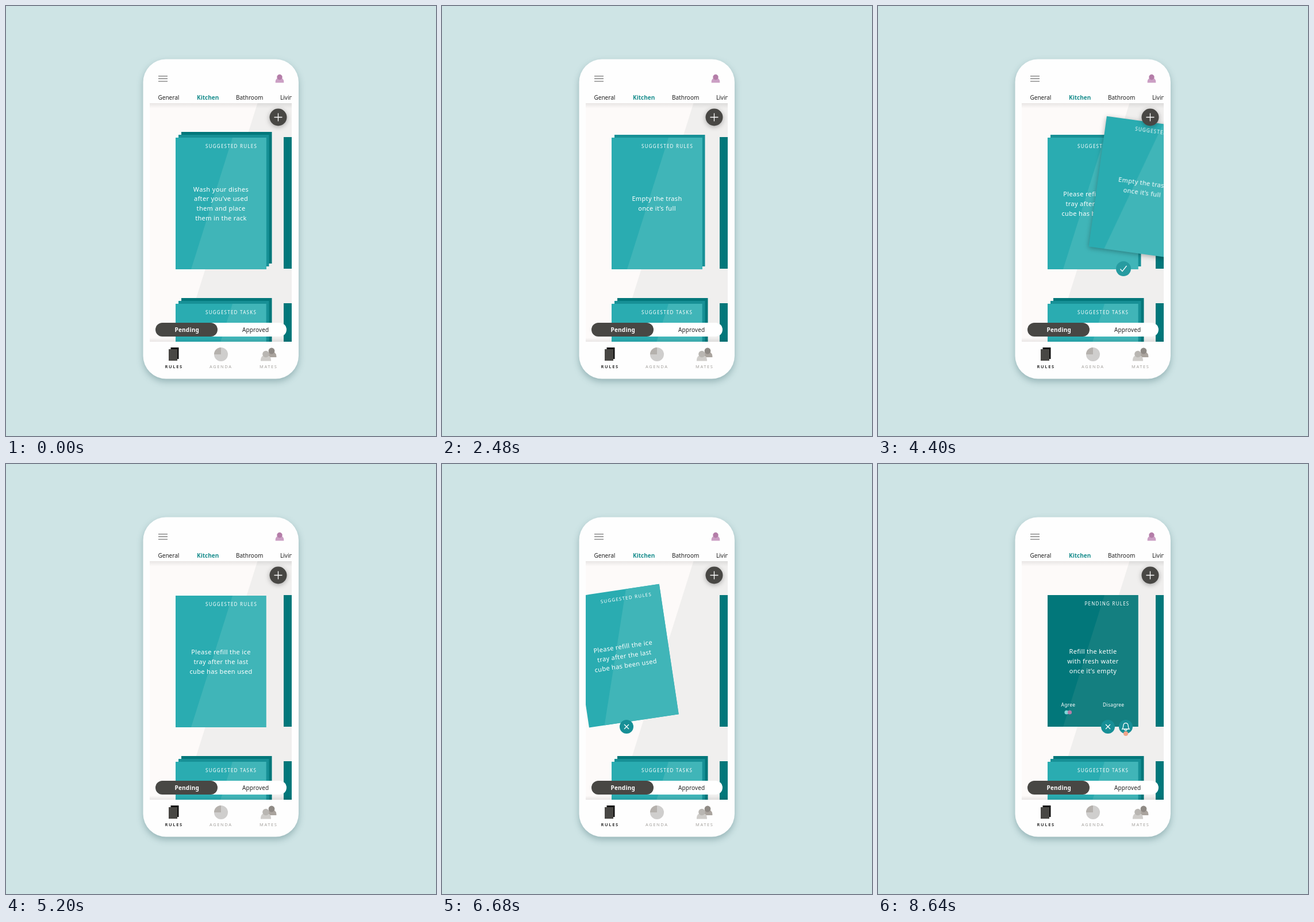
Write an HTML page that moves like this. It is 748 px wide and 748 px high and loops after 8680 ms.

```html
<!DOCTYPE html>
<html lang="en">
<head>
<meta charset="utf-8">
<title>House rules</title>
<style>
html, body { margin: 0; width: 100%; height: 100%; overflow: hidden; background: #cee4e5; }
svg { display: block; width: 100vw; height: 100vh; }
text { font-family: "Noto Sans", "Open Sans", sans-serif; font-size: 10px; fill: #222; }
.title { font-size: 8px; font-weight: 500; letter-spacing: 1.25px; fill: #fff; }
.rule { font-size: 11px; letter-spacing: .35px; fill: #fff; text-anchor: middle; }
.vote { font-size: 8.5px; letter-spacing: .25px; fill: #fff; }
.nav { font-size: 7.5px; letter-spacing: 1.6px; fill: #a5a29e; }
.line { fill: none; stroke: #fff; stroke-width: 1.3; }
.phone { filter: drop-shadow(0 5px 6px rgba(20, 70, 75, .3)); }
.lift { filter: drop-shadow(0 2px 4px rgba(0, 0, 0, .3)); }
</style>
</head>
<body>
<svg id="stage" viewBox="0 0 748 748"></svg>
<script>
const LOOP = 8680;
const W = 157.5, H = 229, X = 295, PITCH = 188;
const TEAL = ['#2aacb1', '#40b5b8'], DARK = ['#02777a', '#147f80'];
const MID = '#179096';

const rect = (x, y, w, h, fill, more = '') =>
  `<rect x="${x}" y="${y}" width="${w}" height="${h}" fill="${fill}" ${more}/>`;
const circle = (x, y, r, fill, more = '') =>
  `<circle cx="${x}" cy="${y}" r="${r}" fill="${fill}" ${more}/>`;
const text = (x, y, str, more = '') => `<text x="${x}" y="${y}" ${more}>${str}</text>`;
const line = d => `<path class="line" d="${d}"/>`;

// A sheet with a diagonal sheen, a heading and centred copy
function card(x, y, [left, right], title, titleX, lines) {
  const copy = lines.map((str, i) =>
    text(x + 79, y + 118.8 + (i - (lines.length - 1) / 2) * 16.7, str, 'class="rule"'));
  return rect(x, y, W, H, left) +
    `<path d="M${x + 99} ${y}H${x + W}V${y + H}H${x + 27}z" fill="${right}"/>` +
    text(x + titleX, y + 18.3, title, 'class="title"') + copy.join('');
}

const person = (x, y, r, head, body) =>
  `<path d="M${x - r * 1.55} ${y + r * 2.05}v-2a${r * 1.55} ${r * 1.5} 0 0 1 ${r * 3.1} 0v2z" fill="${body}"/>` +
  circle(x, y, r, head);

const cross = line('M-4 -4L4 4M4 -4L-4 4');
const crossButton = circle(0, 0, 12, '#178f96') + cross;
const bell = circle(0, 0, 12, '#178f96') +
  line('M-6 4C-4 2 -4.5 -1 -4 -3C-3 -7.5 3 -7.5 4 -3C4.5 -1 4 2 6 4zM-2 4.5a2 2 0 0 0 4 0') +
  circle(0, 12, 4, '#f0a58a');

const rules = [
  ['Wash your dishes', 'after you’ve used', 'them and place', 'them in the rack'],
  ['Empty the trash', 'once it’s full'],
  ['Please refill the ice', 'tray after the last', 'cube has been used']
];
const stack = rules.map((lines, i) =>
  `<g id="card${i}">${card(X, 229, TEAL, 'SUGGESTED RULES', 52, lines)}</g>`).reverse().join('');

const pending = `<g transform="translate(${PITCH})">` +
  card(X, 228, DARK, 'PENDING RULES', 64.5, ['Refill the kettle', 'with fresh water', 'once it’s empty']) +
  text(318.5, 421.5, 'Agree', 'class="vote"') + text(391, 421.5, 'Disagree', 'class="vote"') +
  circle(328, 432, 3.6, '#7fd6d8') + circle(333.5, 432, 3.6, '#b47da8') +
  `<g transform="translate(400 457)">${crossButton}</g>` +
  `<g transform="translate(431 457)">${bell}</g></g>`;

const screen = rect(250, 169, 247, 415, '#fdfaf9') +
  '<path d="M437.500 169H497V584H307z" fill="#f0efee"/>' +
  '<g id="track">' +
  rect(X + 10, 219, W, H, DARK[0], 'id="back"') + rect(X + 5, 224, W, H, MID, 'id="mid"') +
  pending + rect(X + 2 * PITCH, 228, W, H, DARK[0]) + stack + '</g>' +
  rect(X + 10, 508, W, H, DARK[0]) + rect(X + 5, 513, W, H, MID) +
  card(X, 518, TEAL, 'SUGGESTED TASKS', 52, []) + rect(X + PITCH, 517, W, H, DARK[0]) +
  `<g id="no">${crossButton}</g>` +
  `<g id="yes">${circle(0, 0, 13, '#279ba0')}${line('M-5.500 0.500L-2 4.500L5.500 -5')}</g>` +
  rect(250, 169, 247, 9, 'url(#shade)') +
  rect(250, 577, 247, 7, 'url(#shade)', 'transform="rotate(180 373.5 580.5)"') +
  `<g class="lift">${circle(473.5, 193.5, 15, '#484744')}</g>` + line('M466.500 193.500h14M473.500 186.500v14') +
  rect(260, 551, 228, 24, '#fff', 'rx="12"') + rect(260, 551, 108, 24, '#484744', 'rx="12"') +
  text(293.5, 567, 'Pending', 'style="fill:#fff;font-weight:700;letter-spacing:.2px"') +
  text(411, 567, 'Approved', 'letter-spacing=".1"');

const header =
  '<path d="M265 122h16M265 126.500h16M265 131h16" stroke="#555" stroke-width="1.2"/>' +
  person(476, 123.8, 4.7, '#b47da8', '#cb9fc4') +
  text(264.5, 162.5, 'General') +
  text(332, 162.5, 'Kitchen', 'style="fill:#178c8c;font-weight:700"') +
  text(400, 162.5, 'Bathroom') +
  `<g clip-path="url(#view)">${text(477, 162.5, 'Living')}</g>`;

const footer =
  rect(286.5, 594, 14, 20, '#111') + rect(283, 597, 15, 20, '#484744') +
  text(276.5, 630.3, 'RULES', 'class="nav" style="fill:#333;font-weight:600"') +
  circle(374, 606, 12, '#cfcecd') + '<path d="M374 606H362A12 12 0 0 1 374 594z" fill="#b5b1ad"/>' +
  text(354, 630.3, 'AGENDA', 'class="nav"') +
  person(462, 600, 5.4, '#8f8a85', '#aaa49e') + person(452, 605.5, 5.8, '#b9b6b2', '#cfcdca') +
  text(441, 630.3, 'MATES', 'class="nav"');

stage.innerHTML = `<defs>
  <clipPath id="view">${rect(250, 104, 247, 480, '#000')}</clipPath>
  <linearGradient id="shade" x2="0" y2="1"><stop stop-opacity=".08"/><stop offset="1" stop-opacity="0"/></linearGradient>
  </defs>` +
  rect(238.5, 92.5, 270.5, 556, '#fefefe', 'rx="40" class="phone"') +
  `<g clip-path="url(#view)">${screen}</g>` + header + footer;

const $ = id => document.getElementById(id);
const clamp = v => Math.max(0, Math.min(1, v));
const smooth = v => (v = clamp(v)) * v * (3 - 2 * v);

// dir: swipe side, drag: slow pull before the fling, rise: lift, tilt: degrees per pixel
const swipes = [
  { start: 934, dir: -1, drag: 62, rise: 10, ease: 14, tilt: .15, lift: true },
  { start: 3440, dir: 1, drag: 75, rise: 28, ease: 20, tilt: .091, lift: true },
  { start: 5940, dir: -1, drag: 62, rise: 10, ease: 14, tilt: .15, lift: false }
];

function swipe(s, i, now) {
  const t = now - s.start, el = $('card' + i);
  const x = s.drag * smooth(t / 900) + 240 * clamp((t - 880) / 370) ** 2;
  const y = -s.rise * (1 - Math.exp(-x / s.ease));
  const turn = s.dir * Math.min(14, x * s.tilt);
  el.setAttribute('transform', `translate(${s.dir * x} ${y}) rotate(${turn} ${X + W / 2} ${229 + H / 2})`);
  el.setAttribute('class', s.lift && x > 0 ? 'lift' : '');
  el.setAttribute('visibility', t > 1250 ? 'hidden' : 'visible');
  return clamp(t / 560) * (1 - smooth((t - 1250) / 160));
}

const button = (id, x, scale) => $(id).setAttribute('transform', `translate(${x} 457) scale(${scale})`);
const fade = (id, t) => $(id).setAttribute('opacity', 1 - smooth(t / 160));

function frame() {
  const now = performance.now() % LOOP;
  const [a, b, c] = swipes.map((s, i) => swipe(s, i, now));
  button('no', 321, Math.max(a, c));
  button('yes', 427, b);
  fade('back', now - swipes[0].start - 1200);
  fade('mid', now - swipes[1].start - 1200);
  $('track').setAttribute('transform', `translate(${-PITCH * smooth((now - 7240) / 520)})`);
  requestAnimationFrame(frame);
}
frame();
</script>
</body>
</html>
```
